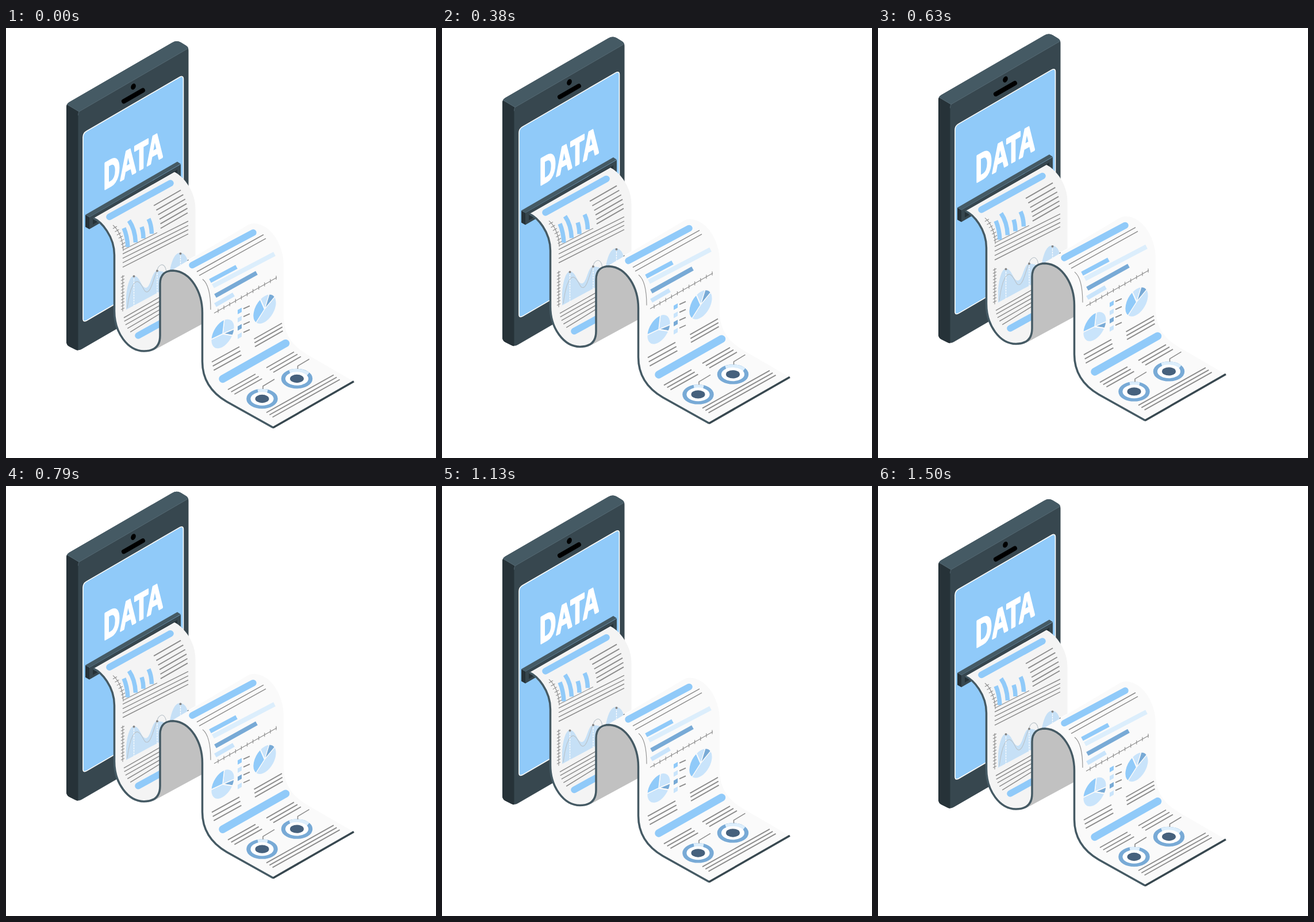
Recreate the animation shown at these times as an HTML page. Size 748x748 px, loop 1.54 s.

```html
<!DOCTYPE html>
<html lang="en">
<head>
<meta charset="utf-8">
<title>Data report</title>
<style>
  html, body { margin: 0; height: 100%; overflow: hidden; background: #fff; }
  svg { display: block; width: 100vw; height: 100vh; }
  .title { stroke: #90caf9; stroke-linecap: round; }
  .thin { fill: none; stroke: #8c8c8c; stroke-width: 1.1; }
  .rule { stroke: #8c8c8c; stroke-width: 1.9; }
  .light { stroke-width: 1.5; }
  .edge { fill: none; stroke: #455a64; stroke-width: 3.5; stroke-linejoin: round; }
</style>
</head>
<body>
<svg viewBox="0 0 748 748">
  <g id="scene">
    <g id="phone">
      <path fill="#37474f" d="M105 138Q105 132 110 129L289 25.500Q297 21 304 25L313 30.500Q317.500 33 317.500 39V451L132 558.500Q126 562 120 559L110 554Q105 551 105 546Z"/>
      <path fill="#263238" d="M106 133L127 145.500Q125.500 148 125.500 152V561Q122 560.500 120 559L110 554Q105 551 105 546V138Q105 135 106 133Z"/>
      <path fill="#455a64" d="M106 133Q107 131 110 129L289 25.500Q297 21 304 25L313 30.500Q316 32 317 35.500L127 145.500Z"/>
      <path fill="none" stroke="#5d717b" stroke-width=".7" d="M106 133L127 145.500L316 36M127 145.500Q125.500 148 125.500 152"/>
      <path fill="#90caf9" stroke="#fff" stroke-width="1.6" d="M134 190Q134 183 140 179.500L302 85.500Q308.500 82 308.500 89V407Q308.500 411 305 413L141 508.500Q134 512.500 134 506Z"/>
      <ellipse cx="221.500" cy="102" rx="4" ry="5.600" transform="rotate(25 221.500 102)"/>
      <path stroke="#000" stroke-width="8" stroke-linecap="round" d="M205 127.500L238 108.500"/>
      <text transform="matrix(.6 -.336 0 1 169.800 281.800)" font-family="'Liberation Sans', Arial, sans-serif" font-weight="700" font-size="65.500" fill="#fff" stroke="#fff" stroke-width="3.400" stroke-linejoin="round">DATA</text>
      <path fill="#37474f" d="M145 329L304 237V258L145 350Z"/>
      <path fill="#263238" d="M138 325L145 329V350L138 346ZM151 332L298 246.500V256L151 342Z"/>
      <path fill="#455a64" d="M138 325L298 232.500L304 236.500L145 329Z"/>
    </g>
    <path fill="#f4f4f4" d="M152 331C166 337 188 362 188 395V492C188 530 212 562 240 562C260 562 268 552 268 535V440C268 430 275 427 280 424L329.500 396V314C329.500 282 307 257 293 250.500Z"/>
    <g id="upper"></g>
    <path fill="#c1c1c1" d="M268 445C268 428 278 422 291 422C322 424 341 460 341 495V515L258 560C266 555 268 546 268 535Z"/>
    <path fill="#fafafa" d="M272 431C276 424 283 422 291 422C322 424 341 460 341 495V580C341 614 360 636 384 650L465 695L605 615L524 568C500 554 483 535 483 500V414C483 378 462 342 432 340Q424 340 417 345Z"/>
    <g id="lower"></g>
    <path class="edge" d="M152 331C166 337 188.500 362 188.500 395V492C188.500 530 212 562 240 562C260 562 268 552 268 535V445C268 428 278 422 291 422C322 424 341.500 460 341.500 495V580C341.500 614 360 636 384 650L465 695.300"/>
    <path class="edge" style="stroke:#37474f" d="M464.500 695.300L605 614.800"/>
  </g>
</svg>
<script>
const BLUE = '#90caf9', LIGHT = '#c9e4fb', PALE = '#dceefc', STEEL = '#78aad6', NAVY = '#46617d';

const path = (d, attrs) => `<path d="${d}" ${attrs}/>`;
const line = (x1, y1, x2, y2, attrs) => path(`M${x1} ${y1}L${x2} ${y2}`, attrs);
const thin = d => path(d, 'class="thin"');
const repeat = (n, draw) => Array.from({ length: n }, (_, i) => draw(i)).join('');
const stroke = (color, width) => `fill="none" stroke="${color}" stroke-width="${width}"`;

// Parallel text lines, each moved by (dx, dy) from the one before.
const rules = (x1, y1, x2, y2, n, dx, dy, kind = '') =>
  repeat(n, i => line(x1 + i * dx, y1 + i * dy, x2 + i * dx, y2 + i * dy, `class="rule ${kind}"`));

const title = (x1, y1, x2, y2, width = 11.5) =>
  line(x1, y1, x2, y2, `class="title" stroke-width="${width}"`);

const polar = (angle, rx, ry = rx) => {
  const a = angle * Math.PI / 180;
  return (rx * Math.cos(a)).toFixed(2) + ' ' + (ry * Math.sin(a)).toFixed(2);
};

// Pie on the upright plane; slices are [from, to, color] in degrees.
const pie = (x, y, slices) =>
  `<g transform="matrix(.866 -.5 0 1 ${x} ${y})" stroke="#fafafa" stroke-width="1.800">` +
  slices.map(([a, b, color]) =>
    path(`M0 0L${polar(a, 23.5)}A23.5 23.5 0 ${b - a > 180 ? 1 : 0} 1 ${polar(b, 23.5)}Z`, `fill="${color}"`)
  ).join('') + '</g>';

const donut = (x, y, from, to) =>
  `<g transform="translate(${x} ${y})">
    <ellipse rx="23.500" ry="13.400" ${stroke(STEEL, 7.5)}/>
    ${path(`M${polar(from, 23.5, 13.4)}A23.5 13.4 0 0 1 ${polar(to, 23.5, 13.4)}`, stroke(PALE, 7.5))}
    <ellipse rx="20" ry="11.800" fill="#fff"/>
    <ellipse rx="12" ry="7.200" fill="${NAVY}"/>
  </g>` + path(`M${x + 1.5} ${y - 17}v-5l20 -12`, stroke('#8c8c8c', 1.6));

const marker = (x, y, bottom) =>
  line(x, y, x, bottom, stroke('#fff', 1.3) + ' stroke-dasharray="3 1.500"') +
  `<circle cx="${x}" cy="${y}" r="2" fill="#858585"/>`;

const columns = ['M205 348Q211 362 212 381', 'M214 335Q224.500 350 225.500 373',
  'M236 346Q239 355 239 366', 'M248 332Q253 342 253.500 358'];

document.getElementById('upper').innerHTML =
  title(180, 328.5, 286, 270) +
  repeat(6, i => {
    const bend = 12 - (5 - i) ** 2 / 2.1;
    return line(257 + bend, 309 + i * 7.9, 304 + bend, 282 + i * 7.9, 'class="rule"');
  }) +
  thin('M186 343C195 350 204 368 204 388M204 386L263 356') +
  repeat(7, i => thin(`M${186 + 16 * Math.sin(i / 4.5)} ${349 + i * 5.6}l7 -4`)) +
  columns.map(d => path(d, stroke(BLUE, 7.5))).join('') +
  repeat(4, i => line(203, 393 + i * 7.7, 317, 336 + i * 7.4, 'class="rule light"')) +
  thin('M203 430V493') +
  repeat(11, i => thin(`M200 ${434 + i * 5.6}l6 -3`)) +
  path('M209 490V468C211 445 216 431 223 431C233 432 235 451 243 452C252 452 253 424 263 422L274 424V455Z' +
       'M285 422C290 396 297 390 305 391C314 394 316 403 317 411Z', 'fill="#c6e0f6"') +
  path('M211 487C214 462 220 440 229 441C238 444 239 461 246 459C254 456 257 432 265 416C272 407 278 414 279 425',
       stroke('#b9c2c9', 1.1)) +
  marker(222.5, 432, 483) + marker(263, 422.5, 461) + marker(303.5, 392.5, 412) +
  repeat(5, i => line(205 + i * i * .7, 504 + i * 6.2, 268, 468 + i * 7.2, 'class="rule light"')) +
  title(230, 535, 270, 513);

document.getElementById('lower').innerHTML =
  title(324, 412.5, 430, 356) +
  rules(332, 424, 448, 359.5, 2, 4, 6.7, 'light') +
  thin('M342 437C352 445 356 462 356 490') +
  line(355, 440, 401, 415.5, stroke(BLUE, 7.5)) +
  line(360, 449, 467, 393, stroke(PALE, 8)) +
  line(364, 466, 436, 426, stroke(STEEL, 7.5)) +
  line(364, 482, 396, 463.5, stroke(LIGHT, 7.5)) +
  thin('M362 496L471 434') +
  repeat(11, i => thin(`M${369 + i * 10.1} ${488.5 + i * -5.75}v7`)) +
  pie(377, 532, [[-82, 8, LIGHT], [8, 33, STEEL], [33, 185, LIGHT], [185, 278, BLUE]]) +
  pie(450, 489, [[139, 248, BLUE], [248, 293, LIGHT], [293, 331, STEEL], [331, 499, LIGHT]]) +
  [BLUE, LIGHT, STEEL, LIGHT].map((color, i) =>
    path(`M403 ${490.5 + i * 14.3}l7 -4v7.500l-7 4Z`, `fill="${color}"`) +
    line(413, 488.5 + i * 13.7, 424, 483.5 + i * 13.7, 'class="rule"')).join('') +
  rules(431.5, 541, 480, 513.5, 3, .8, 6.7) +
  rules(358, 581, 406, 554.5, 3, 1.7, 7.2) +
  title(377, 610.5, 486.5, 548.5, 13.5) +
  rules(453, 591, 501, 563.5, 3, 6, 4) +
  rules(386, 629, 434, 602, 3, 5.7, 4) +
  donut(445.5, 645, 252, 293) +
  donut(506, 610, 238, 325) +
  rules(453, 669, 570, 603.5, 3, 5.3, 4);

const LOOP = 1540, FLOAT = 1500, PHASE = 20, HEIGHT = 14.96;
const scene = document.getElementById('scene');
const start = performance.now();

// Linear rise and fall over one float period.
const lift = t => HEIGHT * (1 - Math.abs(1 - 2 * ((t + PHASE) % FLOAT) / FLOAT));

function draw(now) {
  const t = Math.min(Math.max(now - start, 0) % LOOP, FLOAT);
  scene.setAttribute('transform', `translate(0 ${lift(0) - lift(t)})`);
  requestAnimationFrame(draw);
}
draw(start);
</script>
</body>
</html>
```
